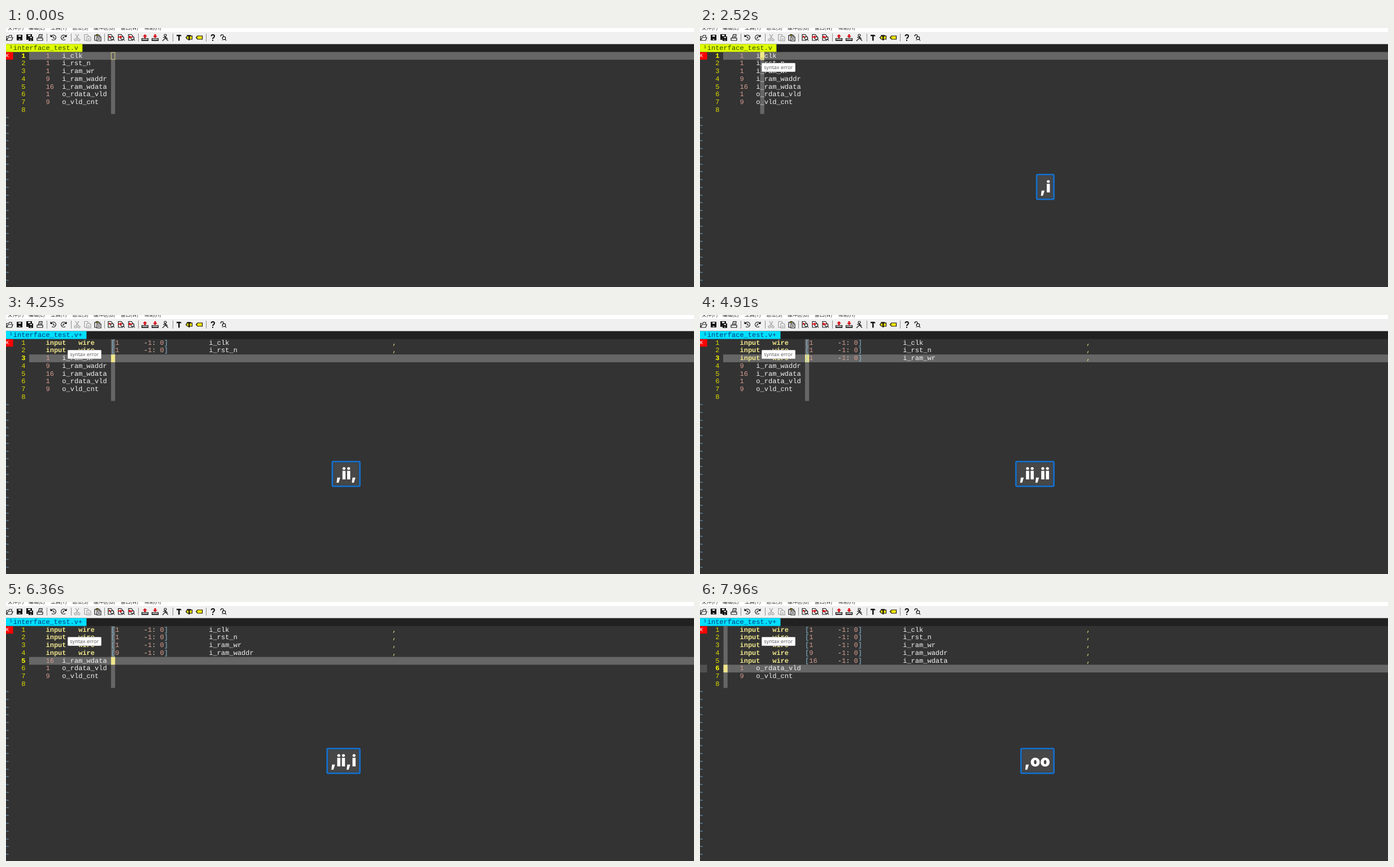
An HTML page that plays this animation: 1218x460 px, repeating every 8 s.

```html
<!DOCTYPE html>
<html lang="zh">
<head>
<meta charset="utf-8">
<title>Verilog port editing</title>
<style>
html, body { margin: 0; width: 100%; height: 100%; overflow: hidden; background: #333; }
svg { display: block; }
text { white-space: pre; text-rendering: geometricPrecision; }
.code { font: 12.03px "Liberation Mono", "Courier New", monospace; }
.menu { font: 8.8px "Noto Sans CJK SC", "Noto Sans CJK", "Noto Sans", sans-serif; fill: #222; }
.tip { font: 9px "Open Sans", "Noto Sans", sans-serif; fill: #555; }
.key { font: 900 28px Inter, "Open Sans", sans-serif; fill: #fff; }
.kw { fill: #f0e68c; font-weight: bold; }
.num { fill: #d69c90; }
.id { fill: #f4f4f4; }
.br { fill: #87bfdc; }
.op { fill: #e6d9c4; }
.comma { fill: #f0e68c; }
.ln { fill: #dcdc00; }
.now { fill: #ffff00; font-weight: bold; }
.tilde { fill: #74b4dc; }
.ic { fill: none; stroke: #111; stroke-width: 1.2; }
.b { fill: #111; stroke: none; }
.r { fill: #d8141c; stroke: none; }
.y { fill: #ffee00; }
.w { fill: #fff; }
.off { opacity: .38; }
</style>
</head>
<body>
<svg width="1218" height="460" viewBox="0 0 1218 460">
  <rect width="1218" height="460" fill="#333"/>
  <rect width="1218" height="29" fill="#f0f0f0"/>
  <rect width="1218" height="7" fill="#fff"/>
  <g id="menu" class="menu"></g>
  <g id="bar" class="ic"></g>
  <rect y="28.6" width="1218" height="14" fill="#212121"/>
  <g id="edit" class="code"></g>
  <g id="tip">
    <rect x="109.5" y="62.5" width="59" height="15" rx="1" fill="#fff" stroke="#c9c9c9"/>
    <text class="tip" x="113.3" y="73.4">syntax error</text>
  </g>
  <g id="keys"></g>
</svg>
<script>
const $ = id => document.getElementById(id);
const LOOP = 8000, CW = 7.218, RH = 13.76, LEFT = 41.6, TOP = 42.6;
const x = col => LEFT + col * CW;
const y = row => TOP + row * RH;
const rect = (l, t, w, h, fill, more = '') =>
  `<rect x="${l}" y="${t}" width="${w}" height="${h}" fill="${fill}" ${more}/>`;
const text = (l, b, s, cls) => `<text x="${l}" y="${b}" class="${cls}">${s}</text>`;

const PORTS = [
  ['1', 'i_clk'], ['1', 'i_rst_n'], ['1', 'i_ram_wr'], ['9', 'i_ram_waddr'],
  ['16', 'i_ram_wdata'], ['1', 'o_rdata_vld'], ['9', 'o_vld_cnt']
];
const HEAD = '    input   wire';

// time, row, column, stage of the row, upper keys, lower keys
const STEPS = [
  [0, 0, 20, 'unfocused', '', ''],
  [1050, 0, 9, '', '', ''],
  [1980, 0, 9, 'blink', '', ''],
  [2250, 0, 9, '', '', ''],
  [2380, 0, 9, '', '', ','],
  [2520, 0, 9, '', '', ',i'],
  [2660, 0, 9, '', '', ',ii'],
  [2780, 0, 0, 'home', '', ',ii'],
  [2920, 0, 91, 'push', '', ',ii'],
  [3050, 0, 20, 'full', '', ',ii'],
  [3180, 1, 20, '', '', ',ii'],
  [3450, 1, 20, '', ',ii', ','],
  [3720, 1, 20, '', ',ii', ',i'],
  [3850, 1, 0, 'home', ',ii', ',ii'],
  [3990, 1, 91, 'push', ',ii', ',ii'],
  [4120, 1, 20, 'full', '', ',ii'],
  [4250, 2, 20, '', '', ',ii,'],
  [4380, 2, 20, '', '', ',ii,i'],
  [4520, 2, 0, 'home', '', ',ii,ii'],
  [4650, 2, 91, 'push', '', ',ii,ii'],
  [4910, 2, 20, 'full', '', ',ii,ii'],
  [5050, 3, 20, '', '', ',ii,ii'],
  [5180, 3, 20, '', ',ii,ii', ','],
  [5310, 3, 20, '', ',ii,ii', ',i'],
  [5440, 3, 0, 'home', ',ii,ii', ',ii'],
  [5590, 3, 91, 'push', ',ii,ii', ',ii'],
  [5840, 3, 20, 'full', '', ',ii'],
  [5970, 4, 20, '', '', ',ii'],
  [6100, 4, 20, '', '', ',ii,'],
  [6360, 4, 20, '', '', ',ii,i'],
  [6510, 4, 20, '', '', ',ii,ii'],
  [6640, 4, 91, 'push', '', ',ii,ii'],
  [6770, 4, 20, 'full', '', ',ii,ii'],
  [6910, 5, 20, '', '', ',ii,ii'],
  [7560, 5, 20, '', ',ii,ii', ','],
  [7690, 5, 20, '', ',ii,ii', ',o'],
  [7830, 5, 20, '', '', ',oo'],
  [7960, 5, 0, 'home', '', ',oo']
];

function lineText(i, row, stage) {
  const [width, name] = PORTS[i];
  if (i < row || (i === row && stage === 'full'))
    return ((HEAD.padEnd(20) + '[' + width.padEnd(7) + '-1: 0]').padEnd(44) + name).padEnd(89) + ',';
  const tail = width.padEnd(4) + name;
  return i === row && stage === 'push' ? HEAD.padEnd(92) + tail : '    ' + tail;
}

function tokenClass(s) {
  if (/^(input|wire)$/.test(s)) return 'kw';
  if (/^\d/.test(s)) return 'num';
  if (/^[a-z]/.test(s)) return 'id';
  return s === ',' ? 'comma' : /[[\]]/.test(s) ? 'br' : 'op';
}

const codeLine = (s, row) => [...s.matchAll(/[a-z]\w*|\d+|[[\]:,-]/g)]
  .map(m => text(x(m.index), y(row) + 10, m[0], tokenClass(m[0]))).join('');

function drawEditor(t, row, col, stage) {
  const changed = t >= 2780;
  let out = rect(0, 28.6, changed ? 142.5 : 135.3, 14, changed ? '#00dfff' : '#dfff00') +
    `<text x="${x(-5)}" y="39" fill="${changed ? '#003a78' : '#2f4a00'}">¹interface_test.v${changed ? '+' : ''}</text>`;

  out += rect(x(col), 43, CW, y(8) - 43, '#666');
  out += rect(LEFT - .6, y(row), 1218, RH, '#666');
  if (row && (stage === 'home' || stage === 'push')) out += rect(0, y(row), 12.5, RH, '#505050');
  out += rect(0, 43, 12.5, 13.2, '#f00') + text(-1.7, 52.4, 'x', 'id');

  if (stage === 'unfocused')
    out += rect(x(col) + .4, y(row) + .9, CW - .8, RH - 1.6, 'none', 'stroke="#d8d080"');
  else if (stage !== 'blink' && stage !== 'push')
    out += rect(x(col), y(row), CW, RH, '#f0e68c');

  for (let i = 0; i < 8; i++)
    out += text(x(-2), y(i) + 10, i + 1, i === row ? 'now' : 'ln');
  for (let i = 0; i < PORTS.length; i++) out += codeLine(lineText(i, row, stage), i);
  if (col === 9 && stage !== 'blink')
    out += rect(x(9), y(0), CW, RH, '#f0e68c') + `<text x="${x(9)}" y="${y(0) + 10}" fill="#708050">_</text>`;
  for (let i = 8; i < 30; i++) out += text(-1.7, y(i) + 10.4, '~', 'tilde');
  $('edit').innerHTML = out;
}

function keyBox(s, top) {
  if (!s) return '';
  let w = 14;
  for (const c of s) w += c === 'o' ? 18.5 : 9.2;
  const l = 627.5 - w;
  return rect(l + 1, top + 1, w - 2, 44, '#474747', 'rx="2" stroke="#1271d3" stroke-width="2.6"') +
    rect(l + 3.6, top + 3.6, w - 7.2, 38.8, 'none', 'stroke="#3d454d" stroke-width="2"') +
    text(l + 7, top + 33, s, 'key');
}

// toolbar
const P = (d, cls = '') => `<path d="${d}" class="${cls}"/>`;
const MAG = '<circle cx="2" cy="1" r="2.7" class="w"/>' + P('M4 3L6 5.5');
const PAGE = P('M-5-5.500H0L2-3V5H-5Z', 'w');
const disk = P('M-5-5H5V5H-5Z', 'b') + P('M-2.500-4.500H3V-1H-2.500ZM-2 2H2V4.500H-2Z', 'w');
const tray = P('M-5.500 1.500H5.500V5.500H-5.500Z', 'w') + P('M-5 4H5');
const bend = P('M-3.500-3A4.500 4.500 0 1 1-3 3.500') + P('M-5.500-5.500V-1H-1Z', 'b') + P('M0-2V1H2.500');
const tag = P('M-3-3H5.500V3H-3L-5.500 0Z', 'y');
const hammer = P('M-4-5H3L5-2.500H1.500V5.500H-1V-2.500H-4Z', 'b');
const ICONS = [
  [6, P('M-5 5V-2H-1L0-4H4V-1M-5 5L-2 0H6L4 5Z', 'w')],
  [24, disk],
  [42, `<g transform="translate(-1 -1)">${disk}</g><g transform="translate(2 2) scale(.8)">${disk}</g>`],
  [60, P('M-3 1L-1-5.500H4L3 1Z', 'w') + P('M-5 1H5V5H-5Z', 'w') + P('M-4 3.500H2', 'r') + P('M0-3H2M-1-1H2')],
  [84, bend],
  [102, `<g transform="scale(-1 1)">${bend}</g>`],
  [126, `<g class="off">${P('M-3-6L2 2M3-6L-2 2')}<circle cx="-3" cy="4" r="2"/><circle cx="3" cy="4" r="2"/></g>`],
  [144, `<g class="off">${PAGE}${P('M-1-2H4L6 0V6H-1Z', 'w')}${P('M1 2H4M1 4H4')}</g>`],
  [162, P('M-5-4H4V5H-5Z') + P('M-2-5.500H1V-3H-2Z', 'y') + P('M-1-1H6V6H-1Z', 'w') + P('M1 1.500H4M1 3.500H4')],
  [186, PAGE + P('M-4-3H-1V0H-4Z', 'r') + MAG],
  [204, PAGE + MAG + P('M-6-2H-2V-4L2-1L-2 2V0H-6Z', 'r')],
  [222, PAGE + MAG + P('M2-2H-2V-4L-6-1L-2 2V0H2Z', 'r')],
  [246, tray + P('M-1.500 1V-2H-4L0-6L4-2H1.500V1Z', 'r')],
  [264, tray + P('M-1.500-6V-3H-4L0 1L4-3H1.500V-6Z', 'r')],
  [282, '<circle cx="0" cy="-4" r="2"/>' + P('M0-2V1L-5 6M0 1L5 5.500M-4 0L0-1L4 2')],
  [306, hammer],
  [324, tag + `<g transform="scale(.9)">${hammer}</g>`],
  [342, tag + P('M-3 0H-2')],
  [366, P('M-2.500-2.500C-2.500-6 3-6 3-2.500C3 0 0 0 0 2.500M0 4V6', 'q')],
  [384, P('M-4-2C-4-6 1-6 1-3C1-1-1-1-1 2M-1 4V5') + MAG]
];
const SEPS = [72, 115, 174, 234, 295, 354];
$('bar').innerHTML = ICONS.map(([cx, art]) => `<g transform="translate(${cx} 17)">${art}</g>`).join('') +
  SEPS.map(s => rect(s, 10, 1, 14, '#8c8c8c', 'stroke="none"')).join('');
$('bar').querySelector('.q').style.strokeWidth = 2;

const MENU = [[3, '文件(F)'], [40, '编辑(E)'], [79, '工具(T)'], [117, '语法(S)'],
  [155, '缓冲区(B)'], [203, '窗口(W)'], [245, '帮助(H)']];
$('menu').innerHTML = MENU.map(([l, s]) => text(l, 3.2, s, '')).join('');

let shown = null;
function frame(now) {
  const t = now % LOOP;
  const step = STEPS.findLast(s => s[0] <= t);
  $('tip').style.display = t < 1180 ? 'none' : '';
  if (step !== shown) {
    shown = step;
    const [, row, col, stage, upper, lower] = step;
    drawEditor(step[0], row, col, stage);
    $('keys').innerHTML = keyBox(upper, 205.6) + keyBox(lower, 259.2);
  }
  requestAnimationFrame(frame);
}
const start = performance.now();
frame(0);
const tick = frame;
frame = () => tick(performance.now() - start);
</script>
</body>
</html>
```
